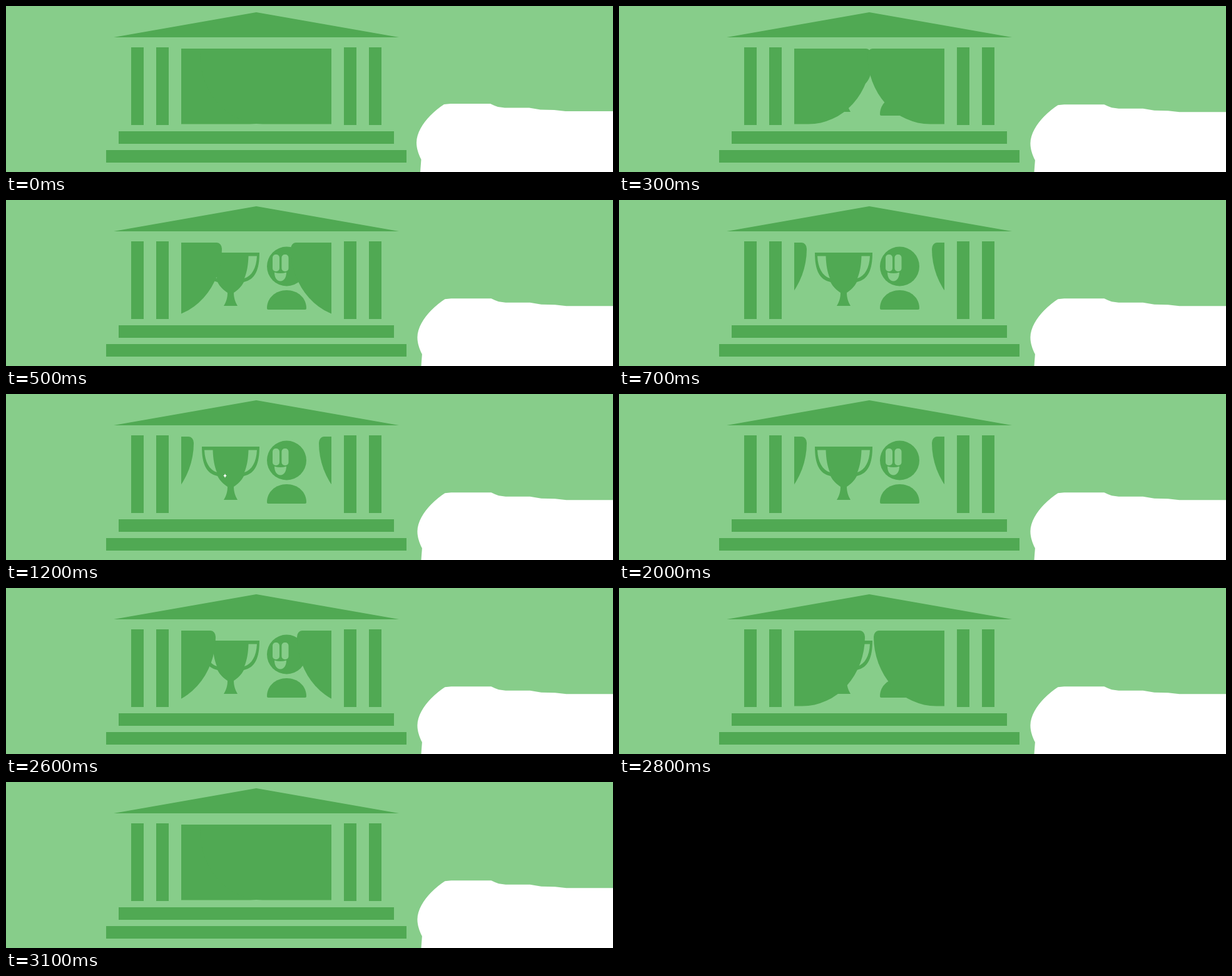
Write an HTML page with a canvas that moves like this. It is 970 by 265 pixels and loops after 4600 ms.

```html
<!DOCTYPE html>
<html lang="en">
<head>
<meta charset="utf-8">
<title>Museum curtain</title>
<style>
  html, body { margin: 0; width: 100%; height: 100%; overflow: hidden; background: #87cd8a; }
  canvas { display: block; }
</style>
</head>
<body>
<canvas id="stage" width="970" height="265"></canvas>
<script>
const ctx = document.getElementById('stage').getContext('2d');
const LIGHT = '#87cd8a', DARK = '#50a953', WHITE = '#fff';
const LOOP = 4600, STEP = 100;
const CLOSED = 490, OPEN = 300, SPEED = 0.29;
const MID = 400;

const cupBody = new Path2D(`M313 84H405C405 112 398 127 380 131C376 139 370 144 364 148
  C364 156 366 162 370 169H348C352 162 354 156 354 148
  C348 144 342 139 338 131C320 127 313 112 313 84Z`);
const cupHole = new Path2D('M317 89.5H330.5C331 104 333 115 337 125C325 121 318 109 317 89.5Z');
const mouth = new Path2D('M429 115.5Q434 117 438.5 117Q443 117 448 115.5C448 124 444 129.5 438.5 129.5C433 129.5 429 124 429 115.5Z');
const bust = new Path2D('M417 173C417 156 431 144 448.5 144C466 144 480 156 480 173Q480 175 478 175H419Q417 175 417 173Z');
const cloud = new Path2D(`M662 265L662.5 258L663.5 245C659 236 656 227 656 218
  C656 203 666 187 678 175Q689 164 700 157L710 156L774 156
  Q780 159 786 161L797 162.5L836 162.5L854 165.5L876 166L894 168H972V265Z`);

// Sparkles: centre and time of full size
const sparkles = [[350, 130.5, 1400], [381, 108, 1590], [327, 84, 1700]];

function fill(path, color) {
  ctx.fillStyle = color;
  ctx.fill(path);
}

function box(x, y, w, h, color = DARK) {
  ctx.fillStyle = color;
  ctx.fillRect(x, y, w, h);
}

function mirrored(axis, draw) {
  draw();
  ctx.save();
  ctx.translate(axis * 2, 0);
  ctx.scale(-1, 1);
  draw();
  ctx.restore();
}

function building() {
  fill(new Path2D('M172 50L400 10L628 50Z'), DARK);
  mirrored(MID, () => {
    box(200, 66, 20, 124);
    box(240, 66, 20, 124);
  });
  box(180, 200, 440, 20);
  box(160, 230, 480, 20);
}

function trophy() {
  fill(cupBody, DARK);
  mirrored(359, () => fill(cupHole, LIGHT));
}

function person() {
  const head = new Path2D();
  head.arc(448.5, 106, 31.5, 0, Math.PI * 2);
  fill(head, DARK);
  const eyes = new Path2D();
  eyes.roundRect(426, 87, 11, 27, 5);
  eyes.roundRect(440.5, 87, 11, 27, 5);
  fill(eyes, LIGHT);
  fill(mouth, LIGHT);
  fill(bust, DARK);
}

function curtainEdge(t) {
  if (t < STEP || t >= 3100) return CLOSED;
  if (t < 700) return 345 + (500 - t) * SPEED;
  if (t < 2500) return OPEN;
  return 306 + (t - 2500) * SPEED;
}

function curtains(edge) {
  const half = new Path2D();
  half.moveTo(180, 68);
  half.lineTo(edge - 8, 68);
  half.ellipse(edge - 8, 78, 8, 10, 0, -Math.PI / 2, 0);
  half.ellipse(edge - 100, 78, 100, 110.5, 0, 0, Math.PI / 2);
  half.lineTo(180, 188.5);
  half.closePath();
  ctx.save();
  ctx.beginPath();
  ctx.rect(280, 67, 240, 123);
  ctx.clip();
  mirrored(MID, () => fill(half, DARK));
  ctx.restore();
}

function sparkle(x, y, size) {
  if (size <= 0) return;
  const w = 8 * size, h = 10.3 * size, k = 0.16;
  const star = new Path2D();
  star.moveTo(x, y - h);
  for (const [px, py, sx, sy] of [[w, 0, 1, -1], [0, h, 1, 1], [-w, 0, -1, 1], [0, -h, -1, -1]]) {
    star.quadraticCurveTo(x + sx * w * k, y + sy * h * k, x + px, y + py);
  }
  fill(star, WHITE);
}

function draw(t) {
  box(0, 0, 970, 265, LIGHT);
  building();
  trophy();
  person();
  curtains(curtainEdge(t));
  for (const [x, y, peak] of sparkles) sparkle(x, y, 1 - Math.abs(t - peak) / 300);
  ctx.save();
  if (t >= STEP) ctx.translate(1.4, 1.2);
  fill(cloud, WHITE);
  ctx.restore();
}

const start = performance.now();

function tick() {
  const t = (performance.now() - start) % LOOP;
  draw(Math.floor(t / STEP) * STEP);
  requestAnimationFrame(tick);
}

tick();
</script>
</body>
</html>
```
